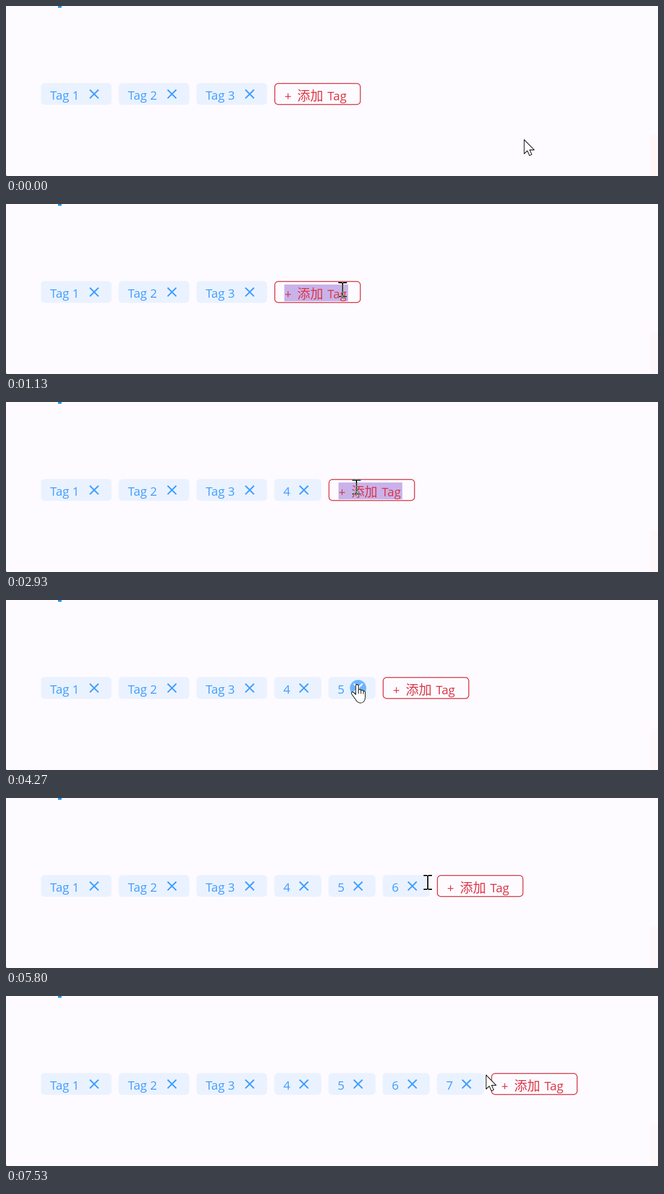
Recreate the animation shown at these times as an HTML page. Size 1079 px wide and 283 px high, loop 8 s.

```html
<!DOCTYPE html>
<html lang="zh">
<head>
<meta charset="utf-8">
<title>Tag list</title>
<style>
  html, body { margin: 0; width: 100%; height: 100%; overflow: hidden; background: #fdfbff; }
  svg { display: block; width: 1079px; height: 283px; isolation: isolate; }
  text { font: 20px "Open Sans", "Noto Sans", sans-serif; white-space: pre; }
  .chip rect { fill: #eaf2ff; }
  .chip text { fill: #409eff; }
  .cross { fill: none; stroke: #409eff; stroke-width: 2.3; }
  .hover .cross { stroke: #fff; }
  .disc { fill: #6fb4ff; }
  .add text { fill: #dc3545; }
  .add .han { font: 300 21.5px "Noto Sans CJK SC", "Noto Sans CJK", sans-serif; }
  .frame { fill: #fdfbff; stroke: #d83a4a; stroke-width: 1.5; }
  .caret { fill: #dc3545; }
  .select { fill: #c9b2ea; }
  .ibeam { fill: #fff; mix-blend-mode: difference; }
  .pointer { fill: #fff; stroke: #111; stroke-width: 1.1; stroke-linejoin: round; }
</style>
</head>
<body>
<svg viewBox="0 0 1079 283">
  <rect width="1079" height="283" fill="#fdfbff"/>
  <rect x="86" width="6" height="3" fill="#2196f3"/>
  <rect y="282" width="1" height="1" fill="#444"/>
  <rect id="panel" x="1067" y="214" width="20" height="80" rx="4"/>
  <g id="tags"></g>
  <g id="cursor"></g>
</svg>
<script>
const LOOP = 8000;
const LEFT = 57.8, GAP = 11.8, WIDE = 116.9, NARROW = 77.9;

// time, digit chips, field content, caret offset
const FIELD = [
  [0, 0, 'label'],
  [600, 0, 'label', 109.3],
  [1070, 0, 'select'],
  [1730, 0, 'typed'],
  [1930, 1, 'label'],
  [2670, 1, 'label', 37.6],
  [2870, 1, 'select'],
  [3600, 1, 'typed'],
  [3730, 2, 'label'],
  [4670, 2, 'label', 82],
  [5070, 2, 'select'],
  [5530, 2, 'typed'],
  [5800, 3, 'label'],
  [6670, 3, 'label', 82],
  [6800, 3, 'select'],
  [7400, 3, 'typed'],
  [7530, 4, 'label']
];

// time, hotspot x, hotspot y, shape
const MOUSE = [
  [0, 857, 222, 'arrow'],
  [70, 845, 217, 'arrow'],
  [130, 800, 204, 'arrow'],
  [200, 725, 185, 'arrow'],
  [270, 650, 165, 'arrow'],
  [330, 592, 152, 'arrow'],
  [400, 559, 144.5, 'ibeam'],
  [1130, 557, 142.5, 'ibeam'],
  [2470, 565, 143, 'ibeam'],
  [2530, 569, 143.5, 'ibeam'],
  [2730, 574, 143.5, 'ibeam'],
  [2930, 580, 141.5, 'ibeam'],
  [4270, 581, 140, 'hand'],
  [4330, 588, 140, 'hand'],
  [4400, 606, 141, 'arrow'],
  [4470, 644, 141.5, 'ibeam'],
  [4530, 680, 141.5, 'ibeam'],
  [4600, 698, 140.5, 'ibeam'],
  [6270, 704, 143, 'arrow'],
  [6330, 722, 143.5, 'ibeam'],
  [6400, 748, 143.5, 'ibeam'],
  [6470, 772, 143.5, 'ibeam'],
  [6530, 788, 143.5, 'ibeam'],
  [6600, 794, 143.5, 'ibeam'],
  [7530, 794, 131, 'arrow']
];

const SHAPES = {
  arrow: `<path class="pointer" d="M.5 .5V24L5.8 19 9.3 27 13.1 25.3 9.6 17.6H17.2Z"/>`,
  ibeam: `<path class="ibeam" d="M-7-12.5H-1.5L0-11.5 1.5-12.5H7V-10.5H1V10.5H7V12.5H1.5L0 11.5-1.5 12.5H-7V10.5H-1V-10.5H-7Z"/>`,
  hand: `<path class="pointer" transform="translate(-10)" d="M7.8 17.5V3Q7.8 .6 10 .6T12.3 3V10.5Q12.5 8.6 14.4 8.6T16.4 11Q16.8 9.7 18.5 9.9T20.4 12.4Q20.8 11.3 22.2 11.6T23.5 14.2V22C23.5 28 20 31.5 15.8 31.5C11 31.5 9 28.5 7 25L1 16.5Q-.2 14 1.8 13.2C4 12.7 5.6 15 7.8 17.5Z
    M12.3 10V16M16.4 10.8V16M20.4 12V16.5"/>`
};

const at = (table, t) => table.findLast(row => row[0] <= t);
const text = (x, y, s, cls = '') => `<text class="${cls}" x="${x}" y="${y}">${s}</text>`;
const box = (cls, x, y, w, h, r = 0) =>
  `<rect class="${cls}" x="${x}" y="${y}" width="${w}" height="${h}" rx="${r}"/>`;

function chip(x, w, label, hover) {
  const cx = x + w - 28.8, cy = 146.6;
  return `<g class="chip ${hover ? 'hover' : ''}">` + box('', x, 128.3, w, 36.2, 6) +
    text(x + 15.2, 156, label) +
    (hover ? `<circle class="disc" cx="${cx}" cy="${cy}" r="13.5"/>` : '') +
    `<path class="cross" d="M${cx - 7.2} ${cy - 7.2}l14.4 14.4m0-14.4l-14.4 14.4"/></g>`;
}

function addField(x, mode, caret, digit) {
  const typed = mode === 'typed';
  let s = box('frame', x + .9, 129.1, typed ? 45 : 141.6, 34.8, 5.5);
  if (mode === 'select') s += box('select', x + 16.7, 134, 105.6, 28);
  s += typed
    ? text(x + 16.7, 157, digit)
    : text(x + 17, 157, '+') + text(x + 38.2, 157, '添加', 'han') + text(x + 88.2, 157, 'Tag');
  if (typed) caret = 28.6;
  if (caret) s += box('caret', x + caret, 133, 2, 29);
  return `<g class="add">${s}</g>`;
}

function tagRow(count, mode, caret, hover) {
  let x = LEFT, s = '';
  for (let n = 1; n <= 3 + count; n++) {
    const w = n <= 3 ? WIDE : NARROW;
    s += chip(x, w, n <= 3 ? 'Tag ' + n : n, hover && n === 5);
    x += w + GAP;
  }
  return s + addField(x, mode, caret, 4 + count);
}

const [panel, tags, cursor] = ['panel', 'tags', 'cursor'].map(id => document.getElementById(id));
let shown = '';

function draw(t) {
  const field = at(FIELD, t), mouse = at(MOUSE, t);
  const key = [field[0], mouse[0], t < 800].join();
  if (key === shown) return;
  shown = key;
  const [, x, y, shape] = mouse;
  panel.setAttribute('fill', t < 800 ? '#fff6f8' : '#fdf7fa');
  tags.innerHTML = tagRow(field[1], field[2], field[3], shape === 'hand');
  cursor.innerHTML = SHAPES[shape];
  // Placed on the shape itself so that its blending reaches the row below.
  const path = cursor.firstElementChild;
  path.setAttribute('transform', `translate(${x} ${y}) ${path.getAttribute('transform') || ''}`);
}

const start = performance.now();
function tick() {
  draw((performance.now() - start) % LOOP);
  requestAnimationFrame(tick);
}
tick();
</script>
</body>
</html>
```
